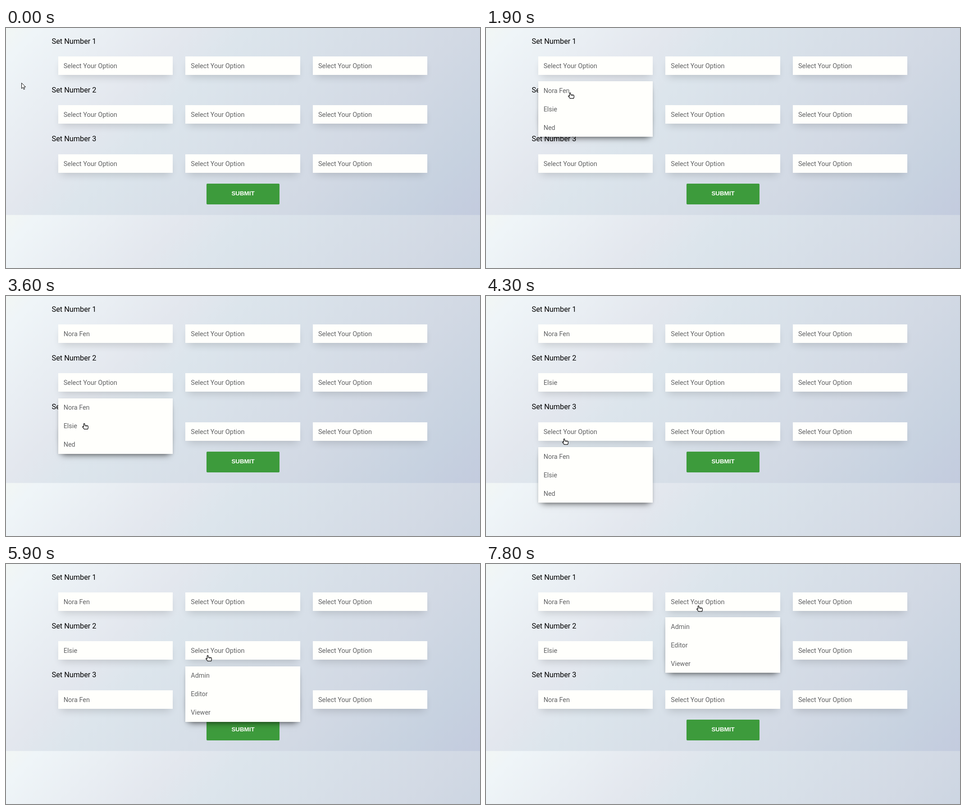
An HTML page for the animation above (8000 ms loop, 1052 px wide and 532 px high).

```html
<!DOCTYPE html>
<html lang="en">
<head>
<meta charset="utf-8">
<title>Option form</title>
<style>
  html, body { margin: 0; width: 100%; height: 100%; overflow: hidden; }
  body {
    position: relative;
    font: 14.4px/41px Roboto, sans-serif;
    color: #5f6062;
    background: linear-gradient(135deg, #f2f6f4, #eff5f8 5%, #e3e7ee 28%, #dce5ec 37%,
      #d2d9e4 70%, #c7d2e0 88%, #c3cbde) 0 0 / 1052px 414.5px;
  }
  body > * { position: absolute; white-space: nowrap; }
  .label { left: 101.5px; font-size: 16.3px; color: #000; }
  .field, .menu { width: 254.6px; background: #fffffc; }
  .field { height: 41px; font-size: 14.5px; box-shadow: 0 10px 18px -6px rgba(0, 0, 0, .16); }
  .menu { height: 123px; box-shadow: 0 10px 14px -8px rgba(0, 0, 0, .6), 0 2px 6px rgba(0, 0, 0, .1); }
  .field div, .menu div { position: relative; top: .8px; padding-left: 12px; }
  .submit {
    left: 445px; width: 162px; height: 46px;
    border-radius: 2px; background: #3d9b3c; color: #fffffc;
    font: bold 13.333px/44px "Liberation Sans", Arial, sans-serif; text-align: center;
  }
  svg { left: 0; top: 0; overflow: visible; fill: #fff; stroke: #000; stroke-linejoin: round; }
</style>
</head>
<body>
<script>
const LOOP = 8000, STEP = 100;
const PLACEHOLDER = 'Select Your Option';
const OPTIONS = [['Nora Fen', 'Elsie', 'Ned'], ['Admin', 'Editor', 'Viewer'], []];
const WIDTH = 254.6, LINE = 41, MENU_OFFSET = 55.2;
const INDEXES = [0, 1, 2];
const fieldX = col => 115.7 + 282.6 * col;
const fieldY = row => 63 + 108.4 * row;

// Time and place of each click, between the pointer's first and last resting place
const CLICKS = [
  [200, 34, 121],
  [1400, 190, 92], [2000, 186, 143],
  [2600, 186, 175], [3900, 173, 282],
  [4300, 173, 316], [5100, 173, 361],
  [5900, 447, 202], [6700, 441, 289],
  [7600, 470, 79],
  [7800, 471, 92]
];

function add(className, y, lines) {
  const box = document.createElement('div');
  box.className = className;
  box.style.top = y + 'px';
  box.append(...lines.map(text => {
    const line = document.createElement('div');
    line.textContent = text;
    return line;
  }));
  document.body.append(box);
  return box;
}

const fields = INDEXES.flatMap(row => {
  add('label', fieldY(row) - 54.5, ['Set Number ' + (row + 1)]);
  return INDEXES.map(col => {
    const box = add('field', fieldY(row), [PLACEHOLDER]);
    box.style.left = fieldX(col) + 'px';
    return { row, col, text: box.firstChild };
  });
});
add('submit', 345, ['SUBMIT']);
const menu = add('menu', 0, ['', '', '']);

document.body.insertAdjacentHTML('beforeend', `
  <svg width="16" height="18">
    <path id="arrow" d="M.6.8V13.2L3.5 10.5 5.5 15.2 7.6 14.3 5.6 9.8H9.6Z"/>
    <g id="hand" transform="translate(-4)" stroke-width="1.2">
      <path d="M3.4 8.3V1.8a1.2 1.2 0 0 1 2.4 0V4.8L11.3 5.4Q13.3 5.7 13.3 7.5V10.5L12.2 13.2H4.6L1 8.7Q.4 7.2 1.6 7 2.6 7 3.4 8.3Z"/>
      <path d="M7.8 5.5V7.5M10 6V7.8" stroke-width=".9"/>
    </g>
  </svg>`);
const cursor = document.querySelector('svg');
const arrow = document.getElementById('arrow');
const hand = document.getElementById('hand');

// The pointer rests for the first and last quarter of each gap between clicks
function pointerAt(time) {
  const now = Math.floor(time / STEP) * STEP;
  const next = CLICKS.findIndex(([clicked]) => clicked > now);
  if (next < 1) return CLICKS.at(next).slice(1);
  const [from, x0, y0] = CLICKS[next - 1];
  const [to, x1, y1] = CLICKS[next];
  const part = Math.min(1, Math.max(0, 2 * (now - from) / (to - from) - .5));
  const eased = part * part * (3 - 2 * part);
  return [x0 + (x1 - x0) * eased, y0 + (y1 - y0) * eased].map(Math.round);
}

const within = (x, y, { col }, top, lines) =>
  x >= fieldX(col) && x < fieldX(col) + WIDTH && y >= top && y < top + lines * LINE;
const menuY = field => fieldY(field.row) + MENU_OFFSET;
const overMenu = (x, y, open) => open && within(x, y, open, menuY(open), 3);
const fieldAt = (x, y) => fields.find(field => within(x, y, field, fieldY(field.row), 1));

function render(time) {
  let open = null;
  const picked = new Map();
  for (const [clicked, x, y] of CLICKS) {
    if (clicked > time) break;
    if (overMenu(x, y, open)) {
      picked.set(open, OPTIONS[open.col][Math.floor((y - menuY(open)) / LINE)]);
      open = null;
    } else {
      open = fieldAt(x, y);
    }
  }

  for (const field of fields) field.text.textContent = picked.get(field) || PLACEHOLDER;
  menu.style.display = open ? '' : 'none';
  if (open) {
    menu.style.left = fieldX(open.col) + 'px';
    menu.style.top = menuY(open) + 'px';
    OPTIONS[open.col].forEach((option, i) => { menu.children[i].textContent = option; });
  }

  const [x, y] = pointerAt(time);
  const clickable = overMenu(x, y, open) || fieldAt(x, y);
  cursor.style.transform = `translate(${x}px, ${y}px)`;
  hand.style.display = clickable ? '' : 'none';
  arrow.style.display = clickable ? 'none' : '';
}

const began = performance.now();
function tick() {
  render((performance.now() - began) % LOOP);
  requestAnimationFrame(tick);
}
tick();
</script>
</body>
</html>
```
